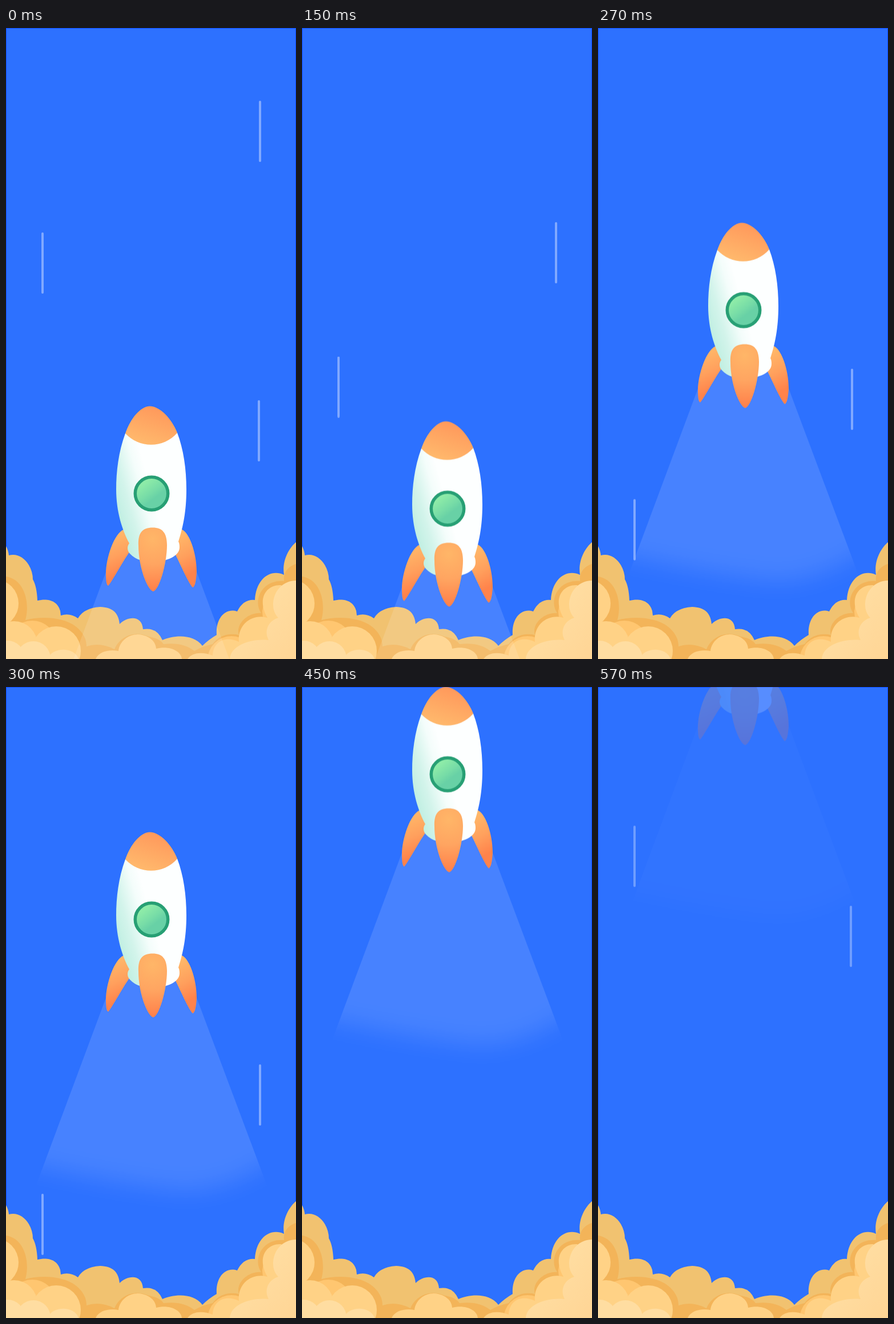
Animation, 508 px wide and 1102 px high, one loop 0.6 s. Source, as an HTML page:

```html
<!DOCTYPE html>
<html lang="en">
<head>
<meta charset="utf-8">
<title>Rocket launch</title>
<style>
  html, body { margin: 0; width: 100%; height: 100%; overflow: hidden; background: #2d71ff; }
  svg { display: block; width: 100vw; height: 100vh; }
</style>
</head>
<body>
<svg viewBox="0 0 508 1102" preserveAspectRatio="none">
  <defs>
    <linearGradient id="hull" gradientUnits="userSpaceOnUse" x1="193" y1="838" x2="258" y2="820">
      <stop offset="0" stop-color="#c0efe2"/>
      <stop offset=".35" stop-color="#d3f4eb"/>
      <stop offset=".75" stop-color="#f4fdfb"/>
      <stop offset="1" stop-color="#fdffff"/>
    </linearGradient>
    <linearGradient id="nose" x1=".75" y1="0" x2=".3" y2="1">
      <stop offset="0" stop-color="#ff965a"/>
      <stop offset="1" stop-color="#ffba6d"/>
    </linearGradient>
    <linearGradient id="fin" x1=".4" y1="0" x2=".6" y2="1">
      <stop offset=".05" stop-color="#ffb869"/>
      <stop offset=".45" stop-color="#ffa05d"/>
      <stop offset=".8" stop-color="#ff834b"/>
    </linearGradient>
    <radialGradient id="midFin" gradientUnits="userSpaceOnUse" cx="257" cy="892" r="88">
      <stop offset="0" stop-color="#ffb668"/>
      <stop offset=".5" stop-color="#ffa561"/>
      <stop offset="1" stop-color="#ff824b"/>
    </radialGradient>
    <linearGradient id="glass" x1=".15" y1=".1" x2=".75" y2=".9">
      <stop offset=".15" stop-color="#8deba8"/>
      <stop offset=".5" stop-color="#77dca7"/>
      <stop offset=".7" stop-color="#68d1a6"/>
    </linearGradient>
    <linearGradient id="puff" x1="0" y1="0" x2="1" y2="1">
      <stop offset=".4" stop-color="#ffdda1"/>
      <stop offset="1" stop-color="#ffd595"/>
    </linearGradient>
    <clipPath id="cone"><path d="M190 910H319L505 1405H5Z"/></clipPath>
    <filter id="soft" filterUnits="userSpaceOnUse" x="-100" y="800" width="720" height="620">
      <feGaussianBlur stdDeviation="21"/>
    </filter>
  </defs>

  <rect width="508" height="1102" fill="#2d71ff"/>
  <rect x=".5" y=".5" width="507" height="1101" fill="none" stroke="#0f4dff"/>

  <g id="clouds">
    <path fill="#f1c270" d="M0 905Q4 912 5 921C18 917 32 924 40 938Q47 950 47 963Q54 975 55 1000C72 996 90 999 95 1018L96 1026Q112 1021 126 1031Q136 1013 165 1011C188 1012 197 1022 199 1041C212 1028 238 1024 240 1050Q264 1046 274 1069C295 1060 328 1058 344 1079Q355 1068 369 1060C367 1030 385 1012 405 1019Q416 997 436 999C438 962 463 944 487 955C483 930 496 908 508 898V1102H0Z"/>
    <path fill="#f3b459" d="M0 958C30 962 43 1000 34 1034C60 1027 100 1028 122 1045Q141 1060 141 1080Q165 1072 190 1085C200 1062 225 1052 250 1063Q270 1066 276 1076Q310 1072 330 1088Q343 1080 362 1076C372 1061 390 1056 408 1060C402 1040 425 1020 447 1022C432 1000 448 963 487 966C485 950 495 940 508 936V1102H0Z"/>
    <g fill="#ffc670">
      <circle cx="46" cy="1078" r="43"/>
      <circle cx="483" cy="1020" r="34"/>
      <circle cx="395" cy="1104" r="42"/>
    </g>
    <g fill="#ffd286">
      <circle cx="-20" cy="1005" r="42"/>
      <circle cx="14" cy="1077" r="41"/>
      <circle cx="88" cy="1088" r="43"/>
      <path d="M157 1102C163 1089 180 1085 197 1088C199 1071 214 1059 231 1059C249 1060 262 1070 263 1084C286 1078 307 1088 308 1102Z"/>
      <path d="M318 1102C326 1090 345 1089 362 1096C363 1070 386 1061 408 1072C405 1043 430 1022 458 1030C440 1000 453 972 482 973L508 1000V1102Z"/>
    </g>
    <g fill="#ffdda1">
      <circle cx="3" cy="1099" r="29"/>
      <circle cx="48" cy="1101" r="30"/>
      <path d="M73 1102C80 1081 120 1080 127 1102Z"/>
    </g>
    <path fill="url(#puff)" d="M508 965C488 965 470 980 468 1004Q467 1020 477 1030C458 1036 452 1054 460 1069C428 1066 394 1078 392 1102H508Z"/>
  </g>

  <g id="streaks" fill="#fff" fill-opacity=".4"></g>

  <g id="rocket">
    <g clip-path="url(#cone)">
      <path fill="#fff" fill-opacity=".125" filter="url(#soft)" d="M-80 820H600V1140L470 1232Q385 1288 310 1287Q200 1276 40 1240L-80 1210Z"/>
    </g>
    <path fill="url(#fin)" d="M206 876C190 882 175 925 175 953C175 965 176 973 179 974C184 970 203 934 217 914L222 890Z"/>
    <path fill="url(#fin)" d="M306 875C320 878 334 915 334 950C333 966 331 976 327 977C320 970 306 938 297 920L296 890Z"/>
    <path fill="url(#hull)" d="M209 708C197 740 193 775 193 806C193 845 204 878 216 900C211 906 213 914 217 918C228 930 243 932 258 932C282 932 304 922 304 907Q304 900 302 897C310 872 316 845 316 806C316 770 311 736 300 707Z"/>
    <path fill="url(#nose)" d="M209 708C218 682 235 661 252 660.500C270 661 290 682 300 707C275 735 233 734 209 708Z"/>
    <circle cx="255" cy="813" r="28.700" fill="url(#glass)" stroke="#279f74" stroke-width="5.500"/>
    <path fill="url(#midFin)" d="M232 904C231 881 239 872.500 257 872.500C274 872.500 282 882 282 903C282 936 268 982 258 984C247 981 232 940 232 904Z"/>
  </g>
</svg>

<script>
  // Each row is [y, opacity] at 0, 25, 50, 75 and 100 % of the loop.
  function run(el, rows) {
    const frames = rows.map(([y, opacity]) => ({
      transform: `translate(0px, ${y}px)`,
      opacity,
      easing: 'steps(5)'
    }));
    el.animate(frames, { duration: 600, iterations: Infinity });
  }

  function streak(x, rows) {
    const line = document.createElementNS('http://www.w3.org/2000/svg', 'rect');
    const box = { x: x - 2, y: 0, width: 4, height: 107, rx: 2 };
    for (const key in box) line.setAttribute(key, box[key]);
    document.getElementById('streaks').append(line);
    run(line, rows);
  }

  run(document.getElementById('rocket'),
    [[0, 1], [26.5, 1], [-407, 1], [-660.5, 1], [-938, 0]]);

  streak(445, [[127, 1], [339, 1], [659, 1], [853, 0], [853, 0]]);
  streak(64, [[357, 1], [573.5, 1], [885, 1], [1007, 0], [51, 1]]);
  streak(443, [[650, 1], [862, 0], [956, 0], [1050, 0], [215, 1]]);
</script>
</body>
</html>
```
